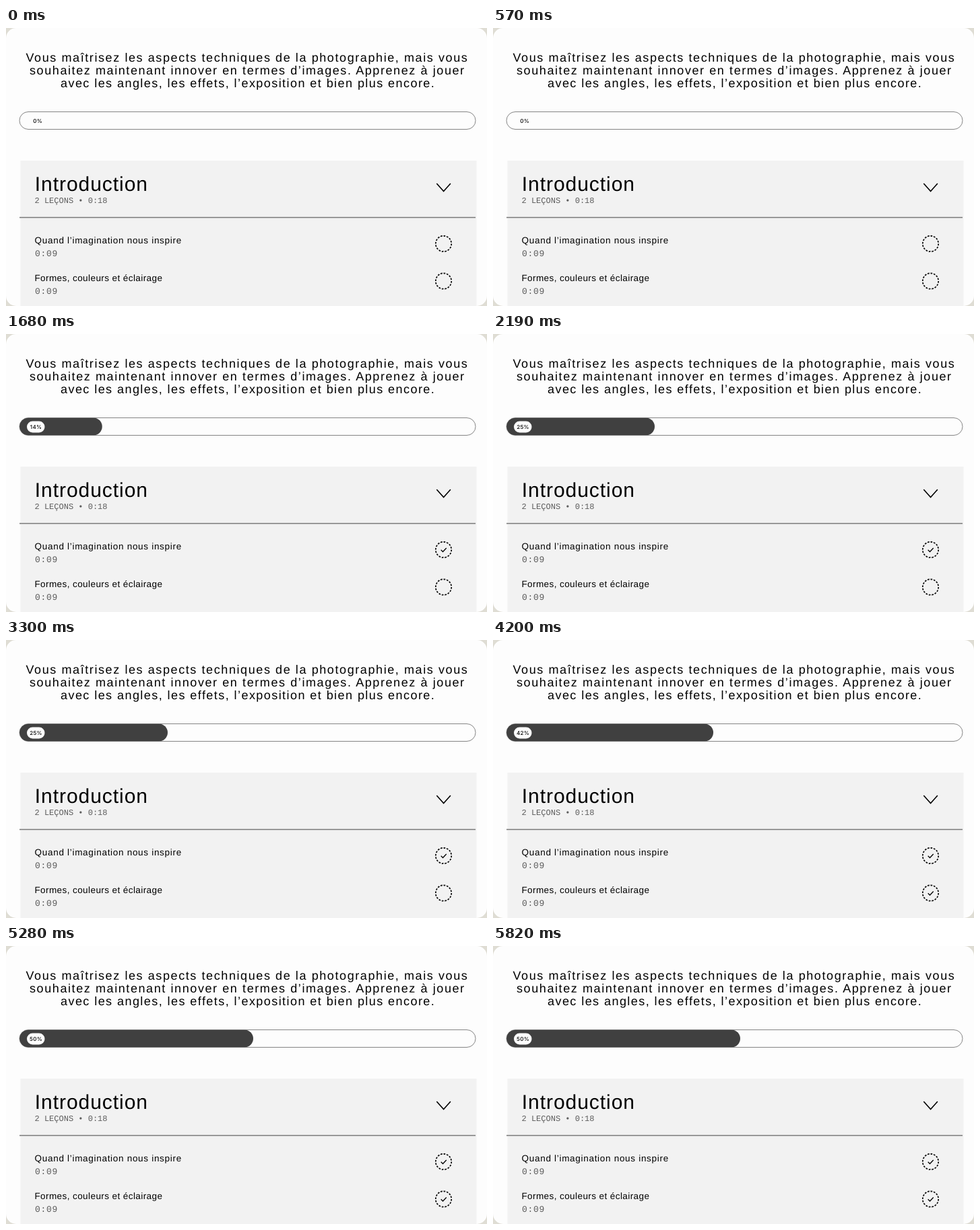
These frames come from a looping animation (714 px wide and 413 px high, 5.85 s). An HTML page:

```html
<!DOCTYPE html>
<html lang="fr">
<head>
<meta charset="utf-8">
<title>Progression</title>
<style>
html, body { margin: 0; width: 100%; height: 100%; overflow: hidden; background: #dfddd4; }
svg { display: block; width: 714px; height: 413px; }
text { font-family: "Liberation Sans", Arial, sans-serif; text-rendering: geometricPrecision; }
.intro { font-size: 18px; }
.title { font-size: 30px; letter-spacing: .95px; }
.lesson { font-size: 13.5px; }
.meta { font: 12px "Liberation Mono", "Courier New", monospace; fill: #5c5c5c; }
.time { font-size: 13px; letter-spacing: .7px; }
.percent { font: 500 8px Inter, sans-serif; letter-spacing: .3px; text-anchor: middle; }
.line { fill: none; stroke: #000; }
</style>
</head>
<body>
<svg viewBox="0 0 714 413">
  <defs>
    <clipPath id="barClip"><rect x="20" y="124.5" width="677" height="26" rx="13"/></clipPath>
    <g id="ring" class="line">
      <circle r="11.7" stroke-width="1.7" pathLength="16" stroke-dasharray=".6 .4"/>
    </g>
    <path id="check" class="line" stroke-width="1.3" d="M-3.8 .3L-1 3L4.2-2.5"/>
  </defs>

  <rect width="714" height="413" rx="15" fill="#fdfdfd"/>

  <g class="intro">
    <text x="29.5" y="50" letter-spacing="1.59">Vous maîtrisez les aspects techniques de la photographie, mais vous</text>
    <text x="35" y="69" letter-spacing="1.59">souhaitez maintenant innover en termes d’images. Apprenez à jouer</text>
    <text x="81" y="88" letter-spacing="1.44">avec les angles, les effets, l’exposition et bien plus encore.</text>
  </g>

  <g clip-path="url(#barClip)"><rect id="fill" x="20" y="124.5" height="26" rx="13" fill="#404040"/></g>
  <rect x="20" y="124.5" width="677" height="26" rx="13" fill="none" stroke="#444" stroke-width=".65"/>
  <rect id="pill" x="31" y="129.5" width="26.5" height="17" rx="8.5" fill="#fdfdfd"/>
  <text id="percent" class="percent" y="141"></text>

  <rect x="21.5" y="197" width="677" height="216" fill="#f2f2f2"/>
  <path d="M20 281.5H697" fill="none" stroke="#777" stroke-width="1.5"/>
  <text class="title" x="42.8" y="242">Introduction</text>
  <text class="meta" x="42.5" y="259.7">2 LEÇONS • 0:18</text>
  <path d="M639.3 231L649.6 242.5L659.9 231" class="line" stroke-width="1.6"/>

  <text class="lesson" x="42.6" y="320" letter-spacing=".7">Quand l’imagination nous inspire</text>
  <text class="meta time" x="43" y="339">0:09</text>
  <text class="lesson" x="42.4" y="375.5" letter-spacing=".42">Formes, couleurs et éclairage</text>
  <text class="meta time" x="43" y="394.5">0:09</text>

  <use href="#ring" x="649.5" y="320.5"/>
  <use href="#ring" x="649.5" y="376"/>
  <use id="check1" href="#check" x="649.5" y="320.5"/>
  <use id="check2" href="#check" x="649.5" y="376"/>
</svg>
<script>
const LOOP = 5850;
const el = id => document.getElementById(id);
const ramp = (t, start, length) => Math.min(1, Math.max(0, (t - start) / length));
const ease = p => p * p * (3 - 2 * p);

function draw(now) {
  const t = now % LOOP;
  const first = ease(ramp(t, 1250, 800));
  const second = ease(ramp(t, 3700, 800));
  const started = first > 0;

  el("fill").setAttribute("width", 220 * first + 127 * second);
  el("pill").setAttribute("opacity", started ? 1 : 0);
  el("percent").setAttribute("x", started ? 44.5 : 47.2);
  el("percent").textContent = Math.round(25 * (first + second)) + "%";
  el("check1").setAttribute("opacity", ramp(t, 950, 150));
  el("check2").setAttribute("opacity", ramp(t, 3400, 150));
}

const begin = performance.now();
function frame() {
  draw(performance.now() - begin);
  requestAnimationFrame(frame);
}
frame();
</script>
</body>
</html>
```
